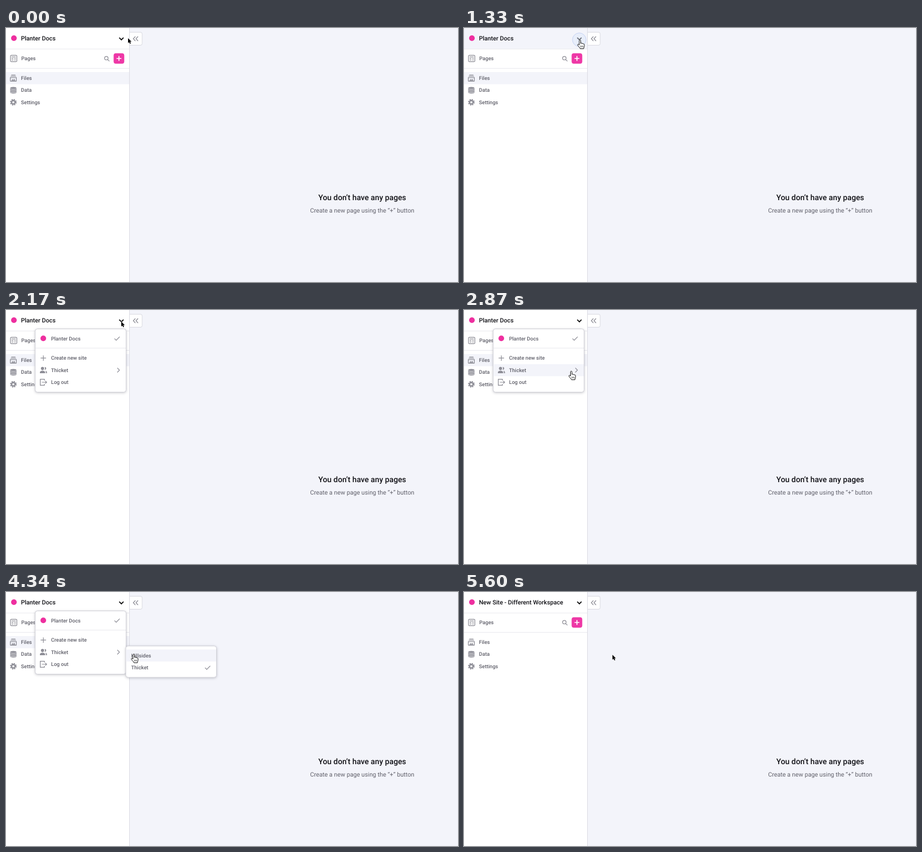
An HTML page that plays this animation: 800 by 450 pixels, repeating every 5810 ms.

```html
<!DOCTYPE html>
<html lang="en">
<head>
<meta charset="utf-8">
<title>Switching workspace</title>
<style>
  html, body { margin: 0; width: 100%; height: 100%; overflow: hidden; background: #f3f4fa; }
  svg { display: block; width: 800px; height: 450px; }
  text { font: 500 9.15px Roboto, sans-serif; fill: #61616b; text-rendering: geometricPrecision; }
  .site { font-size: 10.7px; fill: #111116; }
  .title { font-size: 13.75px; fill: #111116; text-anchor: middle; }
  .hint { font-size: 10.73px; font-weight: 400; text-anchor: middle; }
  .line { fill: none; stroke: #8b8b94; stroke-width: 1.2; }
  .solid { fill: #8e8e97; }
  .rule { stroke: #e9e9ee; }
  .hover { fill: #f3f4fa; }
  .brand { fill: #ee2f9f; }
  .panel { fill: #fff; stroke: #d0d0d7; filter: drop-shadow(0 1px 2px rgba(40, 40, 60, .25)); }
</style>
</head>
<body>
<svg viewBox="0 0 800 450">
  <rect width="800" height="450" fill="#f3f4fa"/>
  <rect width="218" height="450" fill="#fff"/>
  <rect id="headerHover" class="hover" width="218" height="37"/>
  <rect id="filesHover" class="hover" y="78" width="218" height="21.5"/>
  <path class="rule" d="M0 37.2H218M0 71.5H218"/>
  <path d="M218.5 0V450" stroke="#dcdce3"/>

  <!-- Collapse button -->
  <path d="M218.5 7.5H238a3 3 0 0 1 3 3V27.500a3 3 0 0 1-3 3H218.500Z" fill="#fff" stroke="#d9dae1"/>
  <path class="line" d="M229 15l-3.700 4 3.700 4M233.700 15l-3.700 4 3.700 4"/>

  <!-- Header -->
  <circle class="brand" cx="14" cy="18" r="5"/>
  <text id="siteName" class="site" x="26.500" y="21.700"></text>
  <path d="M200.400 17.200l3.800 3.800 3.800-3.800" fill="none" stroke="#111" stroke-width="1.800"/>

  <!-- Pages bar -->
  <rect class="line" x="8" y="48.300" width="11.200" height="11.400" rx="1.500"/>
  <path class="line" d="M10 51.300h7.200M10 54.300h3M14.500 54.300h2.700M10 57h3M14.500 57h2.700"/>
  <text x="27" y="57">Pages</text>
  <circle class="line" cx="177.600" cy="53.400" r="3.100" stroke-width="1.500"/>
  <path class="line" d="M179.900 55.800l3.100 3.100" stroke-width="1.800"/>
  <rect x="190.500" y="44.700" width="18.800" height="18.600" rx="4" fill="#ee38a6"/>
  <path d="M195.600 54h8.600M199.900 49.700v8.600" stroke="#fff" stroke-width="1.700"/>

  <!-- Navigation -->
  <path class="line" d="M9.300 83.300h7.400M8.300 85.500h9.400"/>
  <path class="line" d="M7.600 87.800h10.800v5.600a1 1 0 0 1-1 1H8.600a1 1 0 0 1-1-1Z"/>
  <path class="solid" d="M9 93.600l2.500-3 1.500 1.400 1.700-1.700 2.400 3.300Z"/>
  <text x="26.500" y="91.700">Files</text>
  <path class="solid" d="M7.400 106.500c0-2.800 11.200-2.800 11.200 0v7.500c0 2.900-11.200 2.900-11.200 0Z"/>
  <path d="M7.400 107c1 2.200 10.200 2.200 11.200 0M7.400 110c1 2.200 10.200 2.200 11.200 0M7.400 113c1 2.200 10.200 2.200 11.200 0" fill="none" stroke="#fff" stroke-width=".8"/>
  <text x="26.500" y="113.300">Data</text>
  <circle cx="13" cy="131.600" r="4.900" fill="none" stroke="#8e8e97" stroke-width="2" stroke-dasharray="2.150 1.698"/>
  <circle cx="13" cy="131.600" r="3.100" fill="none" stroke="#8e8e97" stroke-width="2.300"/>
  <text x="26.500" y="134.700">Settings</text>

  <!-- Empty state -->
  <text class="title" x="630.500" y="304.700">You don’t have any pages</text>
  <text class="hint" x="630.500" y="326.700">Create a new page using the “+” button</text>

  <g id="menu">
    <rect class="panel" x="51.700" y="33.500" width="160.800" height="112" rx="4"/>
    <rect id="rowHover" class="hover" x="52.200" width="159.800" height="21.300"/>
    <circle class="brand" cx="66" cy="50.300" r="5"/>
    <text x="79.700" y="53.600">Planter Docs</text>
    <path class="line" d="M192 50.700l3 3 6.200-6.400" stroke-width="1.500"/>
    <path class="rule" d="M52.200 67.500H212"/>
    <path class="line" d="M61.300 85.200h9.600M66.100 80.400v9.600"/>
    <text x="79.700" y="88.200">Create new site</text>
    <circle class="solid" cx="64.600" cy="103.600" r="2.800"/>
    <path class="solid" d="M60 112v-1.500c0-4 9.200-4 9.200 0v1.500ZM68.300 101c3.800-.6 3.800 5.300 0 4.900 1-1.500 1-3.400 0-4.900ZM69.800 107.500c2 .5 2.700 1.600 2.700 3v1.500H70.500c.1-2 .1-3-.7-4.500Z"/>
    <text x="79.700" y="109.600">Thicket</text>
    <path class="line" d="M197 102.700l3.800 3.900-3.800 3.900" stroke-width="1.500"/>
    <path class="line" d="M68 125v-2.300H60.700v10.600H68V131M63.500 128h8.300M69.500 125.600l2.500 2.400-2.500 2.400"/>
    <text x="79.700" y="131.300">Log out</text>
  </g>

  <g id="submenu">
    <rect class="panel" x="212" y="95.700" width="160.500" height="55.500" rx="4"/>
    <rect class="hover" x="212.500" y="101.800" width="159.500" height="21.400"/>
    <text x="221.500" y="115.700">Hillsides</text>
    <text x="221.500" y="137.200">Thicket</text>
    <path class="line" d="M352.300 134.200l3 3 6.200-6.400" stroke-width="1.500"/>
  </g>

  <circle id="ripple" r="12" fill="#dce6fb" fill-opacity=".45" stroke="#c6d3f3"/>
  <g id="cursor">
    <path id="arrow" d="M0 0V8.700L2 6.900 3.400 10 5 9.300 3.600 6.300H6.200Z" fill="#000" stroke="#fff" stroke-width=".8" paint-order="stroke"/>
    <g id="hand" fill="#fff" stroke="#111" stroke-linejoin="round">
      <path d="M0 2.600C0 .8 2.600 .8 2.600 2.600V7.300C2.900 6.200 4.900 6.400 5 7.700 5.500 6.800 7.200 7.200 7.200 8.400 7.800 7.700 9 8.200 9 9.400V11.600C9 13.600 7.900 14.200 7.800 16.600H1.700C1.300 14.800-1 13.200-2.500 10.900-3.700 9.100-2 7.900-.8 9.200L0 10.100Z"/>
      <path d="M2.500 11.200v3M4.500 11.200v3M6.500 11.200v3" stroke-width=".7"/>
    </g>
  </g>
</svg>
<script>
  const LOOP = 5810, TICK = 70;
  // Cursor hotspot: time, x, y
  const PATH = [
    [0, 216, 18], [140, 214, 18], [350, 214, 18], [910, 204.500, 19], [1050, 204, 20],
    [2170, 204, 20.500], [2730, 189.500, 105], [2870, 188.500, 107],
    [4060, 188.500, 107], [4620, 261, 110.500], [4690, 262.700, 111.300]
  ];
  const CLICKS = [[1260, 1470], [3150, 3360], [5040, 5250]];
  const HEADER_ON = 980, MENU_ON = 1470, SUBMENU_ON = 3360, MENU_OFF = 5250, SITE_SWAP = 5320;
  const ROWS = [39.500, 74.500, 96, 117.300], ROW_HEIGHT = 21.300;

  const el = id => document.getElementById(id);
  const show = (id, on) => el(id).style.display = on ? '' : 'none';
  const ease = p => p * p * (3 - 2 * p);

  function cursorAt(t) {
    const next = PATH.findIndex(key => key[0] > t);
    if (next < 0) return PATH[PATH.length - 1].slice(1);
    const [t0, x0, y0] = PATH[next - 1], [t1, x1, y1] = PATH[next];
    const p = ease((t - t0) / (t1 - t0));
    return [x0 + (x1 - x0) * p, y0 + (y1 - y0) * p];
  }

  function draw(t) {
    const [x, y] = cursorAt(t);
    const menu = t >= MENU_ON && t < MENU_OFF;
    const submenu = t >= SUBMENU_ON && menu;
    const header = t >= HEADER_ON && t < MENU_ON;
    const row = menu && !submenu ? ROWS.find(top => y >= top && y < top + ROW_HEIGHT) : undefined;
    const hand = header || row !== undefined || (submenu && x > 213);
    const click = CLICKS.find(([from, to]) => t >= from && t < to);

    show('headerHover', header);
    show('filesHover', t < SITE_SWAP);
    show('menu', menu);
    show('submenu', submenu);
    show('rowHover', row !== undefined);
    if (row !== undefined) el('rowHover').setAttribute('y', row);
    el('siteName').textContent = t < SITE_SWAP ? 'Planter Docs' : 'New Site - Different Workspace';

    show('ripple', click);
    el('ripple').setAttribute('cx', x);
    el('ripple').setAttribute('cy', y + .7);
    el('cursor').setAttribute('transform', `translate(${x} ${y})`);
    show('arrow', !hand);
    show('hand', hand);
  }

  const start = performance.now();
  function frame() {
    const t = (performance.now() - start) % LOOP;
    draw(Math.floor(t / TICK) * TICK);
    requestAnimationFrame(frame);
  }
  frame();
</script>
</body>
</html>
```
